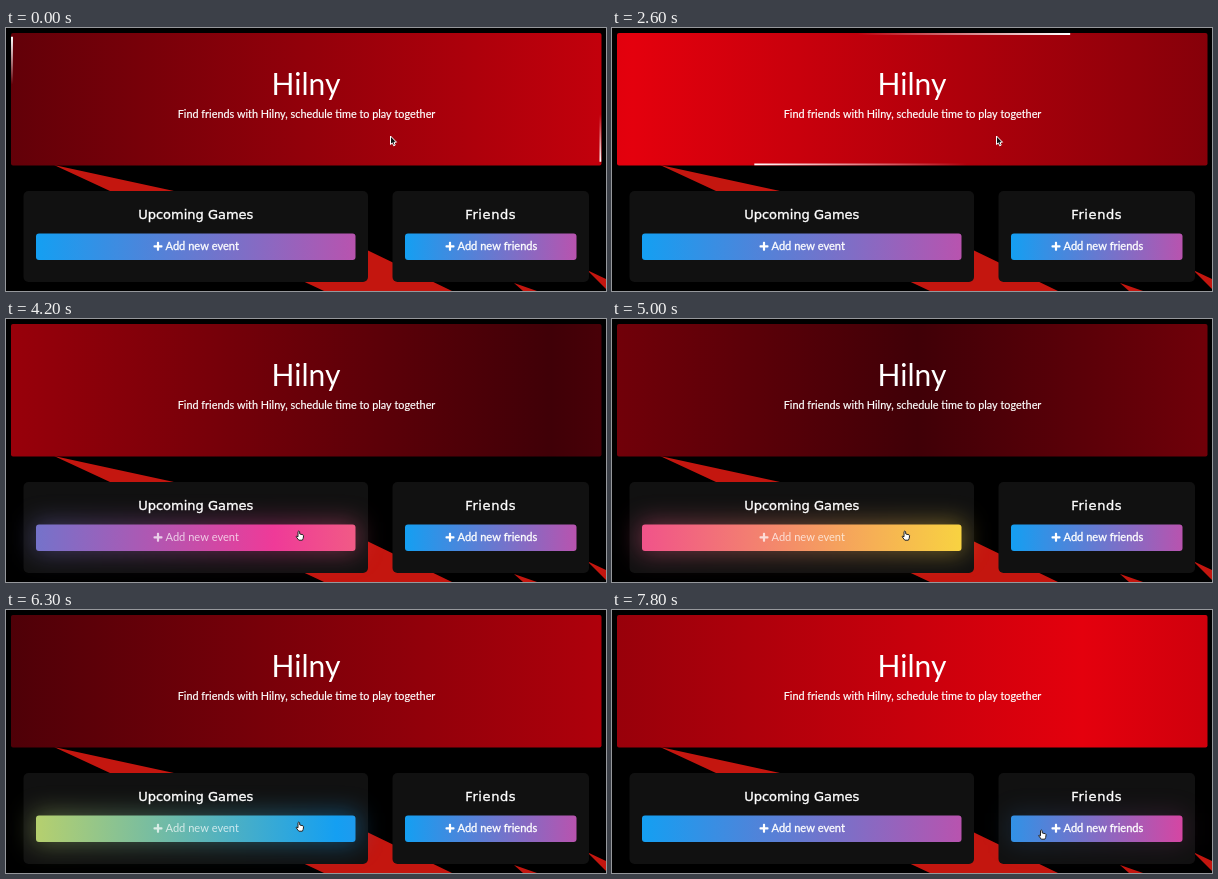
An HTML page with a canvas for the animation above (7.9 s loop, 600 px wide and 263 px high).

```html
<!DOCTYPE html>
<html lang="en">
<head>
<meta charset="utf-8">
<title>Game planner</title>
<style>
  html, body { margin: 0; width: 100%; height: 100%; overflow: hidden; background: #000; }
  canvas { display: block; width: 600px; height: 263px; }
</style>
</head>
<body>
<canvas id="stage"></canvas>
<script>
const W = 600, H = 263, LOOP = 7900, STEP = 100;
const canvas = document.getElementById('stage');
const ctx = canvas.getContext('2d');
const ratio = window.devicePixelRatio || 1;
canvas.width = W * ratio;
canvas.height = H * ratio;

const SANS = 'Lato, "Open Sans", sans-serif';
const TECHNO = '"DejaVu Sans", sans-serif';
const HEADER = { x: 5, y: 5, w: 590.5, h: 132.5 };
const HEADER_COLORS = ['#e4000d', '#400007', '#e4000d'];
const BUTTON_COLORS = ['#149ff2', '#ef3a98', '#f9e437', '#149ff2'];

const CARDS = [
  { x: 17.5, w: 344.5, title: 'Upcoming Games', spacing: 0,
    btn: { x: 30, w: 319.5, label: 'Add new event', labelX: 159.5, hover: [3700, 7300] } },
  { x: 386.5, w: 196.5, title: 'Friends', spacing: 0.6,
    btn: { x: 399, w: 171.5, label: 'Add new friends', labelX: 451.5, hover: [7650, LOOP] } }
];

const SHARDS = [
  [[48, 137], [168, 163], [362, 222.5], [446, 263], [318, 263], [104, 163]],
  [[508, 255], [531, 263], [517, 263]],
  [[583, 243], [600, 251], [600, 261], [583, 244]]
];

// time, x, y of the pointer tip
const POINTER = [[0, 384.5, 108], [3000, 384.5, 108], [3600, 292, 212],
                 [7100, 292, 212], [7700, 428.5, 220]];

const ARROW = [[0, 0], [0, 8.6], [1.9, 6.9], [3.2, 9.8], [4.7, 9.1], [3.5, 6.3], [6, 6.2]];
const HAND = [[0, 0.6], [0.8, 0], [1.6, 0.6], [1.8, 3], [5, 3.8], [5.6, 4.6], [5.2, 7.4],
              [4.4, 9.2], [0.8, 9.2], [-1.8, 5.8], [-1.4, 5], [0, 5.8]];

const mod = (a, n) => ((a % n) + n) % n;

function roundRect(x, y, w, h, r, fill) {
  ctx.beginPath();
  ctx.roundRect(x, y, w, h, r);
  ctx.fillStyle = fill;
  ctx.fill();
}

function polygon(points) {
  ctx.beginPath();
  points.forEach(([x, y]) => ctx.lineTo(x, y));
  ctx.closePath();
}

// weight adds a thin outline that thickens the letters
function text(str, x, y, font, { align = 'center', color = '#fff', spacing = 0, weight = 0 } = {}) {
  ctx.font = font;
  ctx.textAlign = align;
  ctx.letterSpacing = spacing + 'px';
  ctx.fillStyle = color;
  ctx.fillText(str, x, y);
  if (weight) {
    ctx.strokeStyle = color;
    ctx.lineWidth = weight;
    ctx.strokeText(str, x, y);
  }
}

// Two cycles of a repeating horizontal gradient, starting at x
function cycle(x, length, colors) {
  const g = ctx.createLinearGradient(x, 0, x + 2 * length, 0);
  const n = colors.length - 1;
  for (let i = 0; i <= 2 * n; i++) g.addColorStop(i / (2 * n), colors[i % n]);
  return g;
}

function streak(x0, y0, x1, y1) {
  const g = ctx.createLinearGradient(x0, y0, x1, y1);
  g.addColorStop(0, 'rgba(255,255,255,0)');
  g.addColorStop(1, '#fff');
  ctx.strokeStyle = g;
  ctx.lineWidth = 2;
  ctx.beginPath();
  ctx.moveTo(x0, y0);
  ctx.lineTo(x1, y1);
  ctx.stroke();
}

// Light runs along top and bottom, then along both sides
function drawStreaks(t) {
  if (t >= 3000) return;
  const { x, y, w, h } = HEADER;
  const phase = mod(t, 1700);
  const across = (phase - 570) / 430;
  const along = (mod(phase - 850, 1700) - 500) / 360;
  const tail = 0.36;
  ctx.save();
  ctx.beginPath();
  ctx.rect(x, y, w, h);
  ctx.clip();
  if (across > 0 && across < 1 + tail) {
    const a = across * w, b = (across - tail) * w;
    streak(x + b, y + 1, x + a, y + 1);
    streak(x + w - b, y + h - 1, x + w - a, y + h - 1);
  }
  if (along > 0 && along < 1 + tail) {
    const a = along * h, b = (along - tail) * h;
    streak(x + w - 1, y + b, x + w - 1, y + a);
    streak(x + 1, y + h - b, x + 1, y + h - a);
  }
  ctx.restore();
}

function drawHeader(t) {
  const { x, y, w, h } = HEADER;
  const length = 2010;
  const start = mod(800 - 0.3 * t, length) - length;
  roundRect(x, y, w, h, 2, cycle(start, length, HEADER_COLORS));
  drawStreaks(t);
  text('Hilny', 300, 67, '30px ' + SANS);
  text('Find friends with Hilny, schedule time to play together', 300.5, 90,
       '10.85px ' + SANS, { weight: 0.2 });
}

function drawButton(b, t) {
  const [from, to] = b.hover;
  const hovered = t >= from && t < to;
  const length = 4 * b.w;
  const shift = hovered ? mod((t - from) / 3400, 1) * length : 0;
  const fill = cycle(b.x - shift, length, BUTTON_COLORS);
  const y = 205.5, h = 26.5;
  if (hovered) {
    ctx.save();
    ctx.globalAlpha = 0.4 * Math.min(1, (t - from) / 400);
    ctx.filter = `blur(${12 * ratio}px)`;
    roundRect(b.x - 3, y - 3, b.w + 6, h + 6, 4, fill);
    ctx.restore();
  }
  roundRect(b.x, y, b.w, h, 3, fill);
  const dim = hovered && t - from > 300;
  const color = dim ? 'rgba(255,255,255,0.72)' : '#fff';
  const px = b.labelX - 12;
  ctx.beginPath();
  ctx.roundRect(px, 217.2, 9, 2.2, 0.7);
  ctx.roundRect(px + 3.4, 213.8, 2.2, 9, 0.7);
  ctx.fillStyle = color;
  ctx.fill();
  text(b.label, b.labelX, 222.3, '11.1px ' + SANS,
       { align: 'left', color, weight: dim ? 0 : 0.3 });
}

function drawCard(c, t) {
  roundRect(c.x, 163, c.w, 91, 5, '#111');
  drawButton(c.btn, t);
  text(c.title, c.x + c.w / 2, 191.3, '13px ' + TECHNO, { spacing: c.spacing, weight: 0.35 });
}

function drawPointer(t) {
  let i = POINTER.length - 1;
  while (POINTER[i][0] > t) i--;
  const a = POINTER[i], b = POINTER[i + 1] || a;
  const k = b === a ? 0 : (t - a[0]) / (b[0] - a[0]);
  const ease = k * k * (3 - 2 * k);
  const hand = CARDS.some(({ btn }) => t >= btn.hover[0] && t < btn.hover[1]);
  ctx.save();
  ctx.translate(a[1] + (b[1] - a[1]) * ease, a[2] + (b[2] - a[2]) * ease);
  polygon(hand ? HAND : ARROW);
  ctx.lineJoin = 'round';
  ctx.lineWidth = 1;
  ctx.fillStyle = hand ? '#fff' : '#111';
  ctx.strokeStyle = hand ? '#222' : '#fff';
  ctx.fill();
  ctx.stroke();
  ctx.restore();
}

function draw(t) {
  ctx.setTransform(ratio, 0, 0, ratio, 0, 0);
  ctx.fillStyle = '#000';
  ctx.fillRect(0, 0, W, H);
  ctx.fillStyle = '#c4160f';
  SHARDS.forEach(s => { polygon(s); ctx.fill(); });
  drawHeader(t);
  CARDS.forEach(c => drawCard(c, t));
  drawPointer(t);
}

const begin = performance.now();
function tick() {
  const t = mod(performance.now() - begin, LOOP);
  draw(Math.floor(t / STEP) * STEP);
  requestAnimationFrame(tick);
}
tick();
</script>
</body>
</html>
```
